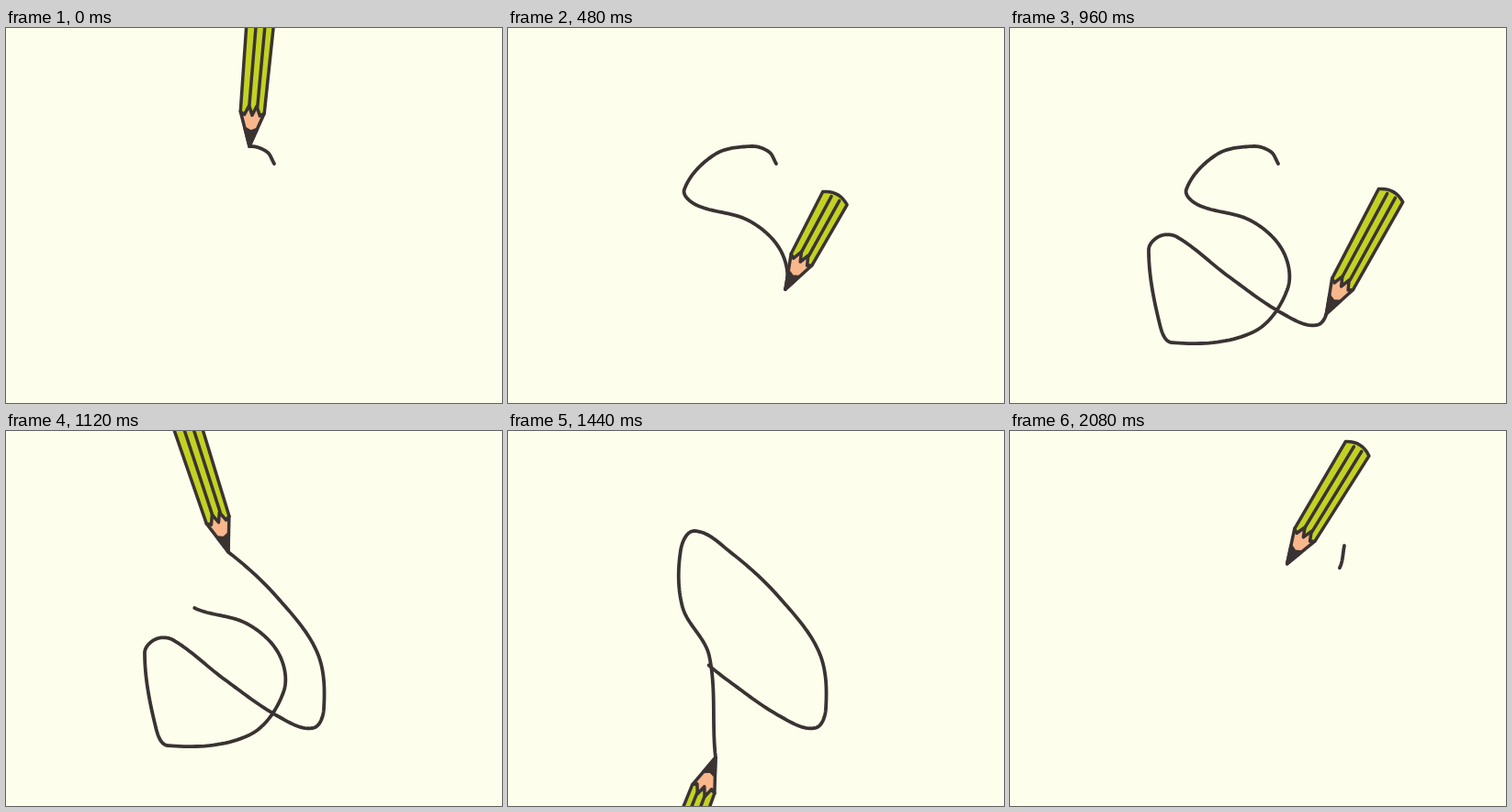
An HTML page with a canvas for the animation above (2160 ms loop, 540 by 409 pixels).

```html
<!DOCTYPE html>
<html lang="en">
<head>
<meta charset="utf-8">
<title>Drawing pencil</title>
<style>
html, body { margin: 0; width: 100%; height: 100%; overflow: hidden; background: #fdfeec; }
canvas { display: block; }
</style>
</head>
<body>
<canvas id="stage" width="540" height="409"></canvas>
<script>
const ctx = document.getElementById('stage').getContext('2d');
const STEP = 80, STEPS = 27, SUB = 20;
const INK = '#3a3332', GREEN = '#c3d222', WOOD = '#f9b78c', PAPER = '#fdfeec';

// x, y of the route; some points also fix the step and the pencil's angle there.
const route = [
  [292, 148], [284, 135], [265, 129, 0, -85], [225, 138], [192, 176], [205, 193],
  [262, 210], [297, 243], [302, 285, 6, -61.5], [264, 332], [176, 343], [163, 323],
  [151, 242], [163, 227, 10, -15], [182, 228], [238, 271], [296, 311], [334, 324],
  [346, 303], [339, 242], [294, 180], [242, 132, 14, -108], [203, 109], [188, 130],
  [190, 192], [219, 245], [226, 356, 18, -249], [235, 380], [259, 405, 20, -355],
  [265, 380], [263, 310], [273, 252, 22, -428], [328, 200], [359, 149],
  [364, 125, 24, -410]
];

const lerp = (a, b, f) => a + (b - a) * f;
const gap = (a, b) => Math.hypot(b[0] - a[0], b[1] - a[1]);
const at = i => route[Math.max(0, Math.min(route.length - 1, i))];

// Smooth curve whose tangents run parallel to the chord between both neighbours.
function curve(i, t) {
  const [a, b, c, d] = [at(i - 1), at(i), at(i + 1), at(i + 2)], size = gap(b, c);
  return [0, 1].map(k => {
    const out = (c[k] - a[k]) / gap(a, c) * size, into = (d[k] - b[k]) / gap(b, d) * size;
    const ease = t * t * (3 - 2 * t);
    return lerp(b[k], c[k], ease) + t * (1 - t) * ((1 - t) * out - t * into);
  });
}

const samples = [{ p: route[0], s: 0 }], keys = [];
for (let i = 0; i < route.length; i++) {
  const [, , step, angle] = route[i];
  if (step !== undefined) keys.push({ step, angle, s: samples.at(-1).s });
  if (i === route.length - 1) break;
  for (let n = 1; n <= SUB; n++) {
    const p = curve(i, n / SUB), prev = samples.at(-1);
    samples.push({ p, s: prev.s + gap(prev.p, p) });
  }
}
const total = samples.at(-1).s, LIFT = keys.at(-1).step;
keys.push({ step: STEPS, angle: -423, s: total });

function keyed(step, name) {
  const i = Math.max(1, keys.findIndex(k => k.step > step));
  const a = keys[i - 1], b = keys[i];
  return lerp(a[name], b[name], (step - a.step) / (b.step - a.step));
}

function pointAt(s) {
  const i = Math.max(1, samples.findIndex(q => q.s >= s));
  const a = samples[i - 1], b = samples[i], f = (s - a.s) / (b.s - a.s);
  return [0, 1].map(k => lerp(a.p[k], b.p[k], f));
}

function tipAt(step) {
  if (step <= LIFT) return pointAt(keyed(step, 's'));
  const f = Math.sin((step - LIFT) / (STEPS - LIFT) * Math.PI / 2);
  return [0, 1].map(k => lerp(at(route.length)[k], route[0][k], f));
}

function trace(points, close) {
  ctx.beginPath();
  points.forEach(([x, y]) => ctx.lineTo(x, y));
  if (close) ctx.closePath();
}

function drawLine(from, to) {
  const inner = samples.filter(q => q.s > from && q.s < to).map(q => q.p);
  trace([pointAt(from), ...inner, pointAt(to)]);
  ctx.lineWidth = 3.8;
  ctx.stroke();
}

function drawPencil([x, y], angle, length) {
  const base = 13, end = 15, cone = 37;
  ctx.save();
  ctx.translate(x, y);
  ctx.rotate(angle * Math.PI / 180);
  ctx.lineWidth = 3.5;

  trace([[0, 0], [cone, -base], [cone + 10, 0], [cone, base]], true);
  ctx.fillStyle = WOOD;
  ctx.fill();
  ctx.stroke();

  // Zigzag edge between paint and wood.
  const jags = [-1, -0.65, -0.32, 0, 0.32, 0.65, 1].map((v, i) =>
    [cone + (i % 2 ? -3 : 8 * (1 - v * v)), v * base]);
  trace(jags);
  ctx.lineTo(length - 5, end);
  ctx.quadraticCurveTo(length + 5, 0, length - 5, -end);
  ctx.closePath();
  ctx.fillStyle = GREEN;
  ctx.fill();
  ctx.stroke();

  for (const side of [-4, 5]) {
    trace([[cone + 7, side], [length - 5, side * 1.1]]);
    ctx.stroke();
  }

  trace([[0, 0], [19, -6.5], [16, 0], [19, 6.5]], true);
  ctx.fillStyle = INK;
  ctx.fill();
  ctx.stroke();
  ctx.restore();
}

function draw(now) {
  const step = Math.floor(now / STEP) % STEPS;
  ctx.fillStyle = PAPER;
  ctx.fillRect(0, 0, 540, 409);
  ctx.lineCap = ctx.lineJoin = 'round';
  ctx.strokeStyle = INK;

  // The line vanishes along the same route, starting late and running twice as fast.
  const tail = Math.max(0, Math.min(total - 25, keyed(Math.min(LIFT, 2 * step - 25.4), 's')));
  drawLine(tail, keyed(step, 's'));

  // The pencil looks shorter while it swings round at the first bend.
  const length = 152 - 34 * Math.exp(-(((step - 6) / 2.5) ** 2));
  drawPencil(tipAt(step), keyed(step, 'angle'), length);
}

const start = performance.now();
function tick() {
  draw(performance.now() - start);
  requestAnimationFrame(tick);
}
tick();
</script>
</body>
</html>
```
